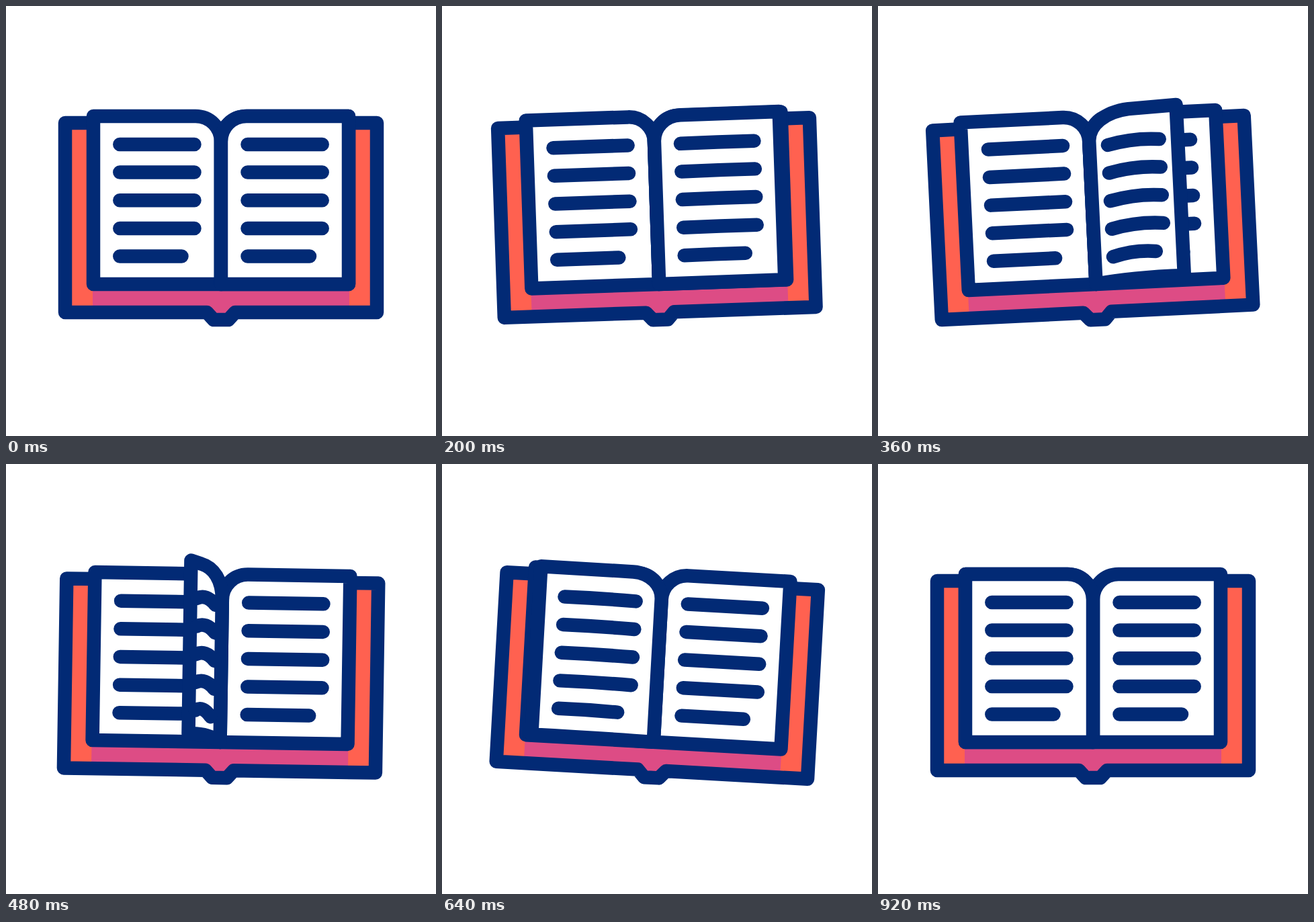
Recreate the animation shown at these times as an HTML page. Size 640 by 640 pixels, loop 0.96 s.

```html
<!DOCTYPE html>
<html lang="en">
<head>
<meta charset="utf-8">
<title>Open book</title>
<style>
  html, body { margin: 0; width: 100%; height: 100%; overflow: hidden; background: #fff; }
  svg { display: block; width: 100%; height: 100%; }
  .line { fill: none; stroke: #022a75; stroke-width: 20.5; stroke-linecap: round; stroke-linejoin: round; }
  .page { fill: #fff; }
</style>
</head>
<body>
<svg viewBox="0 0 640 640">
  <g id="book">
    <path fill="#ff6150" d="M88 174H552V456H88Z"/>
    <path fill="#dd4c85" d="M129 414H511V456H341L331 467H309L299 456H129Z"/>
    <path class="line" d="M130 174H88V456H299L309 467H331L341 456H552V174H510"/>
    <path class="line page" id="left"/>
    <path class="line" id="leftText"/>
    <path class="line page" id="right"/>
    <path class="line" id="rightText"/>
    <path class="line page" id="leaf"/>
    <path class="line" id="leafText"/>
  </g>
</svg>
<script>
const LOOP = 960, STEP = 40;
const SPINE = 320, TOP = 164, BOTTOM = 414, WIDTH = 190;
const ROWS = [206, 247.6, 289.3, 331, 372.5];
const SWING = [[0, 0], [40, 0], [316, -3.15], [600, 3.35], [920, 0], [960, 0]];
const TURN = [[0, 0], [100, 0], [200, .055], [360, .256], [480, .58], [640, .906], [740, 1], [960, 1]];

const $ = id => document.getElementById(id);
const segment = (keys, t) => Math.max(0, keys.findIndex(k => k[0] > t) - 1);

function swing(t) {
  const i = segment(SWING, t), [t0, a] = SWING[i], [t1, b] = SWING[i + 1];
  return a + (b - a) * (1 - Math.cos(Math.PI * (t - t0) / (t1 - t0))) / 2;
}

// Smooth Hermite curve through the turn keys
function turn(t) {
  const i = segment(TURN, t), [t0, a] = TURN[i], [t1, b] = TURN[i + 1];
  const slope = k => {
    if (k < 2 || k > TURN.length - 3) return 0;
    const p = TURN[k - 1], n = TURN[k + 1];
    return (n[1] - p[1]) / (n[0] - p[0]);
  };
  const d = t1 - t0, u = (t - t0) / d, v = 1 - u;
  return a * v * v * (1 + 2 * u) + b * u * u * (3 - 2 * u)
    + d * u * v * (slope(i) * v - slope(i + 1) * u);
}

// side: 1 lies right, -1 lies left; values between are a lifted leaf
function pagePath(side) {
  const w = WIDTH * side, bend = 1 - side * side, lift = 21 * bend;
  const curve = w * (.2 + .5 * bend), x = SPINE + curve, y = TOP - .75 * lift;
  return `M${SPINE} ${BOTTOM}V202`
    + `C${SPINE} ${181 - .4 * lift} ${SPINE + .43 * curve} ${y + .25 * lift} ${x} ${y}`
    + `L${SPINE + w} ${TOP - lift}V${BOTTOM - .6 * lift}`
    + `Q${SPINE + .4 * w} ${BOTTOM - .7 * lift} ${SPINE} ${BOTTOM}Z`;
}

function textPath(side) {
  const lift = 21 * (1 - side * side), last = ROWS.length - 1;
  return ROWS.map((y, i) => {
    const near = side < 0 && i === last ? 58.5 : 39.5;
    const far = side > 0 && i === last ? 132 : 150.7;
    const x = d => SPINE + d * side;
    return `M${x(near)} ${y + .2 * lift}`
      + `Q${x((near + far) / 2)} ${y - .65 * lift} ${x(far)} ${y - .28 * lift}`;
  }).join('');
}

function drawPage(id, side) {
  $(id).setAttribute('d', pagePath(side));
  $(id + 'Text').setAttribute('d', textPath(side));
}

function frame() {
  const t = Math.floor(performance.now() % LOOP / STEP) * STEP;
  $('book').setAttribute('transform', `rotate(${swing(t)} 320 320)`);
  drawPage('leaf', Math.cos(Math.PI * turn(t)));
  requestAnimationFrame(frame);
}

drawPage('left', -1);
drawPage('right', 1);
frame();
</script>
</body>
</html>
```
